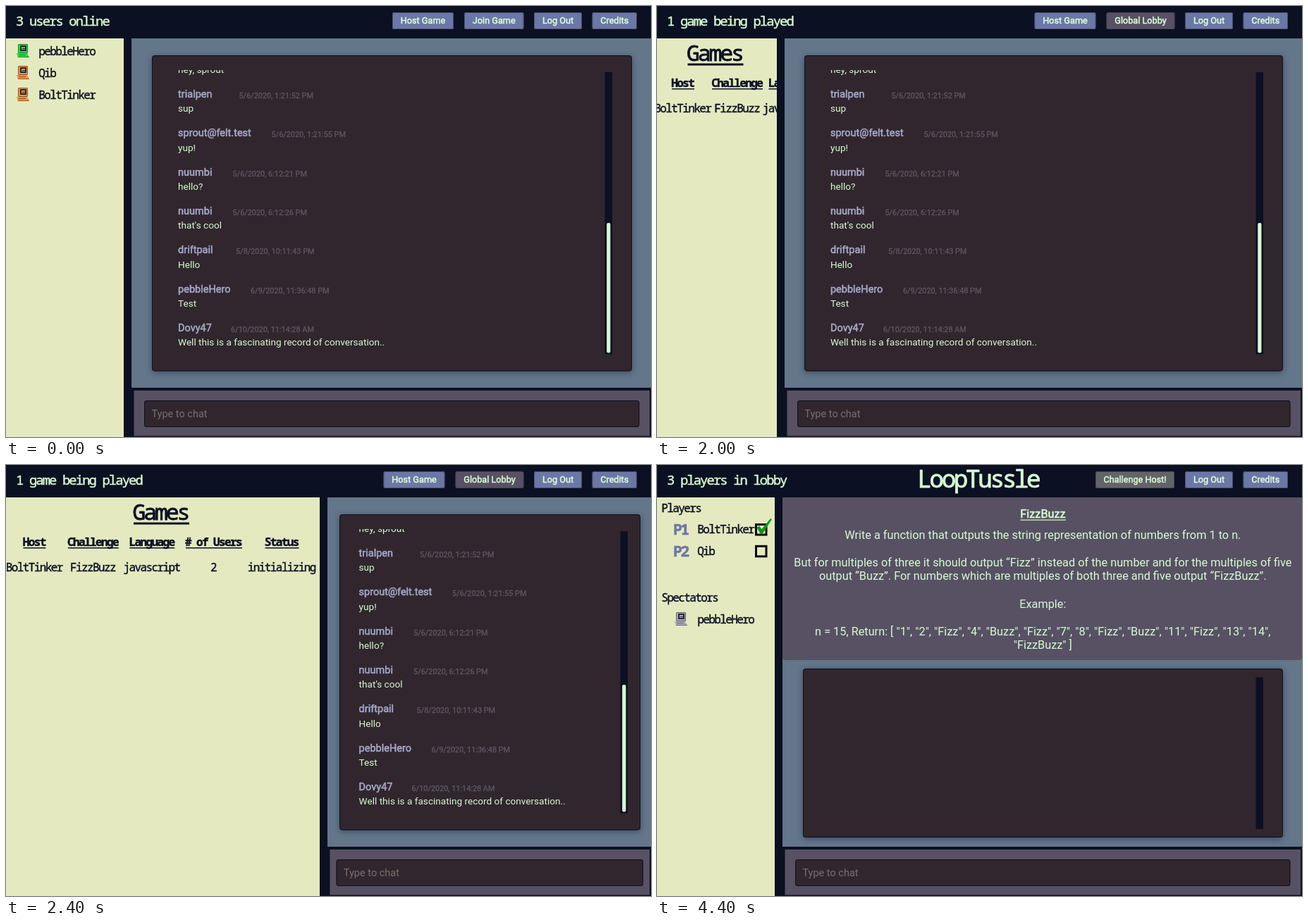
Animation, 915 px wide and 612 px high, one loop 6.1 s. Source, as an HTML page with a canvas:

```html
<!DOCTYPE html>
<html lang="en">
<head>
<meta charset="utf-8">
<title>Chat lobby</title>
<style>
html, body { margin: 0; width: 100%; height: 100%; overflow: hidden; background: #0b1022; }
canvas { display: block; width: 915px; height: 612px; }
</style>
</head>
<body>
<canvas id="stage" width="915" height="612"></canvas>
<script>
const ctx = document.getElementById('stage').getContext('2d');
const LOOP = 6100;
const NAVY = '#0b1022', CREAM = '#e4e9c0', SLATE = '#63768a', PLUM = '#575163',
      DARK = '#31262d', MINT = '#d6fbd2', BLUE = '#6b77a6', LILAC = '#a6a9ca';

const USERS = ['pebbleHero', 'Qib', 'BoltTinker'];

// name, gap to the date, date, message
const CHAT = [
  ['trialpen', 86.5, '5/6/2020, 1:21:52 PM', 'sup'],
  ['sprout@felt.test', 132.5, '5/6/2020, 1:21:55 PM', 'yup!'],
  ['nuumbi', 77.5, '5/6/2020, 6:12:21 PM', 'hello?'],
  ['nuumbi', 77.5, '5/6/2020, 6:12:26 PM', "that's cool"],
  ['driftpail', 82, '5/8/2020, 10:11:43 PM', 'Hello'],
  ['pebbleHero', 103, '6/9/2020, 11:36:48 PM', 'Test'],
  ['Dovy47', 75, '6/10/2020, 11:14:28 AM', 'Well this is a fascinating record of conversation..']
];

// heading, cell, centre when narrow, centre when wide
const COLUMNS = [
  ['Host', USERS[2], 37, 40.5],
  ['Challenge', 'FizzBuzz', 114, 124],
  ['Language', 'javascript', 190.5, 207.5],
  ['# of Users', '2', 251, 295.5],
  ['Status', 'initializing', 320, 392.5]
];

const TASK = [
  'Write a function that outputs the string representation of numbers from 1 to n.',
  '',
  'But for multiples of three it should output “Fizz” instead of the number and for the multiples of five',
  'output “Buzz”. For numbers which are multiples of both three and five output “FizzBuzz”.',
  '',
  'Example:',
  '',
  'n = 15, Return: [ "1", "2", "Fizz", "4", "Buzz", "Fizz", "7", "8", "Fizz", "Buzz", "11", "Fizz", "13", "14",',
  '"FizzBuzz" ]'
];

function rect(x, y, w, h, color) {
  ctx.fillStyle = color;
  ctx.fillRect(x, y, w, h);
}

function box(x, y, w, h, r, fill, stroke) {
  ctx.beginPath();
  ctx.roundRect(x, y, w, h, r);
  ctx.fillStyle = fill;
  ctx.fill();
  if (stroke) {
    ctx.shadowColor = 'transparent';
    ctx.beginPath();
    ctx.roundRect(x + .5, y + .5, w - 1, h - 1, r);
    ctx.strokeStyle = stroke;
    ctx.lineWidth = 1;
    ctx.stroke();
  }
}

function shape(points, fill) {
  ctx.beginPath();
  points.forEach(([x, y]) => ctx.lineTo(x, y));
  ctx.fillStyle = fill;
  ctx.fill();
}

// Fill plus a thin outline, like a synthesised bold
function inked(str, x, y, color, bold) {
  ctx.fillStyle = color;
  ctx.fillText(str, x, y);
  if (!bold) return;
  ctx.strokeStyle = color;
  ctx.lineWidth = bold;
  ctx.lineJoin = 'round';
  ctx.strokeText(str, x, y);
  ctx.lineJoin = 'miter';
}

function sans(str, x, y, size, color, { bold = 0, align = 'left' } = {}) {
  ctx.font = `${size}px Roboto, sans-serif`;
  ctx.letterSpacing = '0px';
  ctx.textAlign = align;
  inked(str, x, y, color, bold);
}

// Tight terminal lettering on a fixed pitch
function mono(str, x, y, pitch, color, { weight = 400, center = false } = {}) {
  const size = pitch * 2;
  const gap = pitch - size * .6;
  ctx.font = `${weight} ${size}px "Noto Sans Mono", monospace`;
  ctx.letterSpacing = gap + 'px';
  ctx.textAlign = 'left';
  const left = center ? x - str.length * pitch / 2 : x;
  inked(str, left + gap / 2, y, color, pitch * .05);
}

function underlined(str, x, y, pitch, weight, drop, thick) {
  const w = str.length * pitch;
  mono(str, x, y, pitch, NAVY, { weight, center: true });
  rect(x - w / 2, y + drop, w, thick, NAVY);
}

function button(label, x, w, color = BLUE) {
  box(x, 9, w, 24, 2.5, color, 'rgba(60,62,85,.7)');
  sans(label, x + w / 2, 25, 12.68, '#dcfdd6', { bold: .5, align: 'center' });
}

function computer(x, y, color) {
  const ink = '#262b2c', shade = 'rgba(30,25,30,.5)';
  box(x + 2, y, 14, 13, 1, color, shade);
  rect(x + 5, y + 2, 9, 8, ink);
  rect(x + 7, y + 4, 5, 4, color);
  rect(x + 8, y + 6, 4, 1, ink);
  shape([[x, y + 13], [x + 15, y + 13], [x + 18, y + 19], [x + 2, y + 19]], color);
  rect(x + 3, y + 15, 10, 1, shade);
  rect(x + 2, y + 18, 16, 1, shade);
}

function frame(w) {
  const left = w + 11;
  rect(0, 0, 915, 612, NAVY);
  rect(0, 46, w, 566, CREAM);
  rect(left, 46, 915 - left, 496, SLATE);
  const px = w + 14.5, pw = 913 - px, pad = pw * .02;
  rect(px, 546, pw, 64.5, PLUM);
  box(px + pad, 560, pw - 2 * pad, 38, 3, DARK, NAVY);
  sans('Type to chat', px + pad + 10.3, 584, 14.5, '#77706f');
}

// Chat panel with its scroll track; returns the text's left edge
function panel(w, top, bottom, trackTop, trackBottom, thumbTop) {
  const area = 904 - w, pw = area * .915 + 7;
  const x = Math.round(w + 11.75 + area / 2 - pw / 2);
  const right = Math.round(x + pw);
  ctx.save();
  ctx.shadowColor = 'rgba(10,16,34,.4)';
  ctx.shadowBlur = 9;
  ctx.shadowOffsetY = 2;
  box(x, top, right - x, bottom - top, 4, DARK, NAVY);
  ctx.restore();
  const tx = right - area * .036 - 12;
  rect(tx, trackTop, 10.5, trackBottom - trackTop, NAVY);
  if (thumbTop) box(tx + 2.7, thumbTop, 5.2, 492.5 - thumbTop, 2, MINT);
  return x + 12 + area * .034;
}

function chat(w) {
  const x = panel(w, 70, 518.5, 94, 494.5, w < 370 ? 308 : 312);
  ctx.save();
  ctx.beginPath();
  ctx.rect(x - 4, 91, 400, 10);
  ctx.clip();
  sans('hey, sprout', x, 95, 13.6, MINT);
  ctx.restore();
  CHAT.forEach(([name, gap, date, msg], i) => {
    const y = 130 + i * 55.35;
    sans(name, x, y, 14.5, LILAC, { bold: .55 });
    sans(date, x + gap, y + 1, 10.88, '#5d5663', { bold: .35 });
    sans(msg, x, y + 20.3, 13.6, MINT);
  });
}

function commonButtons() {
  button('Log Out', 749, 68);
  button('Credits', 831.5, 63.5);
}

function userList() {
  mono('3 users online', 15, 28, 9.42, MINT);
  USERS.forEach((name, i) => {
    const y = 54 + i * 30.8;
    computer(15, Math.round(y), i ? '#ee9540' : '#22e33c');
    mono(name, 47, y + 16.3, 8, NAVY);
  });
}

function gameList(w, hover) {
  mono('1 game being played', 15, 28, 9.42, MINT);
  const k = Math.min(1, Math.max(0, (w - 370) / 76));
  ctx.save();
  ctx.beginPath();
  ctx.rect(0, 46, w, 566);
  ctx.clip();
  underlined('Games', w / 2 - 2, 78, 15.8, 400, 3.5, 3);
  if (hover) rect(0, 129.5, w, 29.5, '#454756');
  for (const [head, cell, narrow, wide] of COLUMNS) {
    const x = narrow + (wide - narrow) * k;
    if (head === '# of Users' && k < .5) {
      underlined('# of', x, 104, 8, 700, 2.5, 1.5);
      underlined('Users', x, 124.5, 8, 700, 2.5, 1.5);
    } else {
      underlined(head, x, 114.5, 8, 700, 2.5, 1.5);
    }
    mono(cell, x, 151, 8, hover ? CREAM : NAVY, { center: true });
  }
  ctx.restore();
}

function lobby(w, time) {
  frame(w);
  chat(w);
  commonButtons();
  if (time < 1900) {
    userList();
    button('Host Game', 548, 87);
    button('Join Game', 650, 84.5, time < 800 ? BLUE : PLUM);
  } else {
    gameList(w, time >= 3200);
    button('Host Game', 535.5, 87);
    button('Global Lobby', 637.5, 97, time < 2800 ? PLUM : BLUE);
  }
}

function duel() {
  frame(167);
  mono('3 players in lobby', 15, 28, 9.42, MINT);
  mono('LoopTussle', 371, 32, 17.2, MINT);
  button('Challenge Host!', 622, 112, '#626467');
  commonButtons();

  mono('Players', 7, 66.5, 8, NAVY);
  [USERS[2], USERS[1]].forEach((name, i) => {
    const y = 97 + i * 30.8;
    mono('P' + (i + 1), 24, y + 2, 10.6, BLUE, { weight: 700 });
    mono(name, 58, y, 8, NAVY);
    ctx.strokeStyle = '#080808';
    ctx.lineWidth = 3;
    ctx.strokeRect(140.5, y - 12.5, 14.5, 14.5);
  });
  shape([[141.5, 89], [145, 86.5], [148.5, 91], [161, 76], [163, 77], [149.5, 98], [147, 98]], '#0b9a16');
  mono('Spectators', 7, 193.5, 8, NAVY);
  computer(25, 209, '#aeaabd');
  mono(USERS[0], 58, 224.5, 8, NAVY);

  box(178, 46, 737, 231, [0, 0, 4, 4], PLUM);
  sans('FizzBuzz', 547.5, 74.5, 16.3, MINT, { bold: .55, align: 'center' });
  rect(515.5, 77.5, 64.5, 1.2, MINT);
  TASK.forEach((line, i) => sans(line, 547.3, 104.5 + i * 19.6, 16.3, MINT, { align: 'center' }));
  panel(167, 289, 529, 301.5, 517);
}

// CSS "ease" curve: find the parameter for x, return y
function ease(x) {
  if (x <= 0) return 0;
  if (x >= 1) return 1;
  const bez = (a, b, t) => 3 * a * t * (1 - t) ** 2 + 3 * b * t * t * (1 - t) + t ** 3;
  let lo = 0, hi = 1;
  for (let i = 0; i < 24; i++) {
    const mid = (lo + hi) / 2;
    if (bez(.25, .25, mid) < x) lo = mid; else hi = mid;
  }
  return bez(.1, 1, lo);
}

function sidebarWidth(time) {
  const step = Math.floor((time - 1900) / 100) * 100;
  return Math.round(167 + 279 * ease((step - 91) / 440));
}

const start = performance.now();

function draw() {
  const time = (performance.now() - start) % LOOP;
  if (time < 4400) lobby(sidebarWidth(time), time);
  else duel();
  requestAnimationFrame(draw);
}

draw();
</script>
</body>
</html>
```
